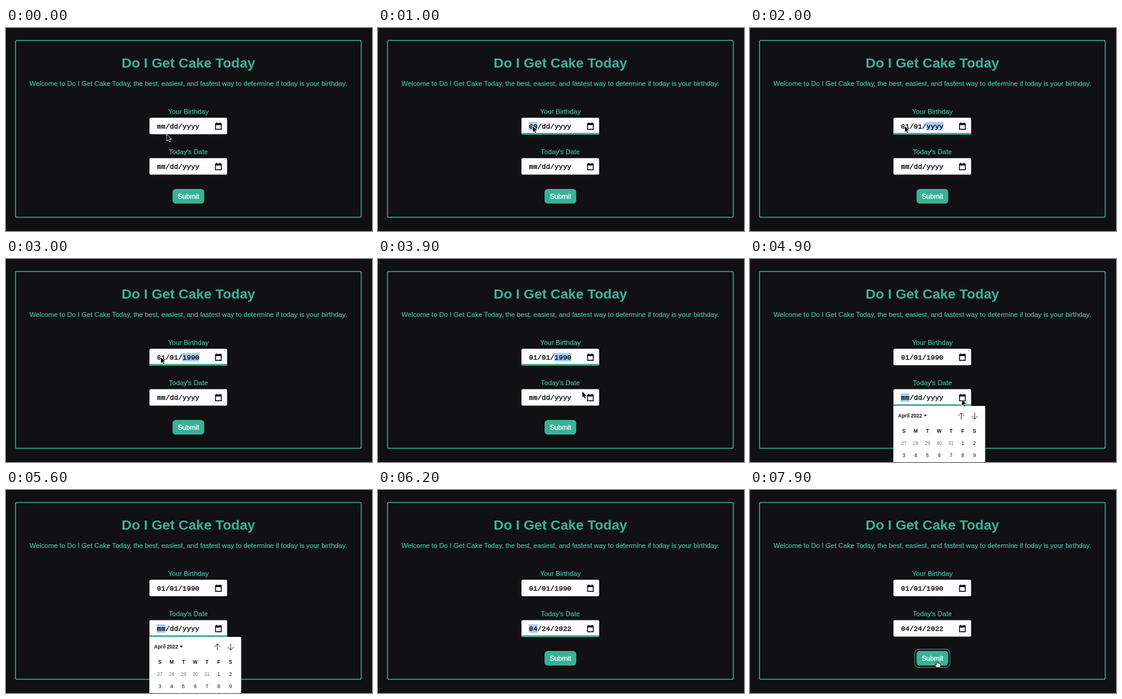
Recreate the animation shown at these times as an HTML page. Size 600 by 333 pixels, loop 8000 ms.

```html
<!DOCTYPE html>
<html lang="en">
<head>
<meta charset="utf-8">
<title>Do I Get Cake Today</title>
<style>
  html, body { margin: 0; width: 100%; height: 100%; overflow: hidden; background: #111012; }
  svg { display: block; width: 600px; height: 333px; }
  text { font: 11.16px "Liberation Sans", Arial, sans-serif; fill: #45bda2; stroke: #45bda2; stroke-width: .2; }
  .mid { text-anchor: middle; }
  .title { font-size: 22.7px; font-weight: bold; fill: #3bb398; stroke: none; }
  .date { font: 11.6px "Liberation Mono", monospace; fill: #000; stroke: #000; stroke-width: .3; }
  .submit { font-size: 11.3px; fill: #fff; stroke: #fff; stroke-width: .3; }
  .teal { fill: #38b196; }
  .line { fill: none; stroke: #3bb097; }
  #popup text { font-size: 8.2px; fill: #111; stroke: none; }
  #popup .bold { font-weight: bold; }
  #popup .dim { fill: #777; }
</style>
</head>
<body>
<svg viewBox="0 0 600 333">
  <defs>
    <g id="calendar">
      <path d="M.8 2H10.2V11.2H.8Z" fill="none" stroke="#000" stroke-width="1.4"/>
      <path d="M.5 1.5H10.5V4.3H.5ZM2 0H3.5V2H2ZM7.5 0H9V2H7.5Z"/>
    </g>
  </defs>
  <rect width="600" height="333" fill="#111012"/>
  <rect class="line" x="15.6" y="20.6" width="566.8" height="290" rx="2" stroke-width="1.5"/>
  <text class="mid title" x="299" y="65">Do I Get Cake Today</text>
  <text class="mid" x="298.8" y="95">Welcome to Do I Get Cake Today, the best, easiest, and fastest way to determine if today is your birthday.</text>
  <text class="mid" x="299" y="141.3">Your Birthday</text>
  <text class="mid" x="299" y="207.2">Today's Date</text>
  <g id="fields"></g>
  <rect id="ring" class="line" x="270" y="261.2" width="57.8" height="29.8" rx="6.5"/>
  <rect class="teal" x="273" y="264" width="52" height="24" rx="5.5"/>
  <text class="mid submit" x="299" y="280">Submit</text>
  <g id="popup">
    <rect x="235" y="241" width="150.5" height="92" fill="#fff"/>
    <text class="bold" x="242.8" y="260">April 2022</text>
    <path d="M285 255.5h5l-2.5 3z"/>
    <path d="M346.3 263V252.5M341.3 257.5L346.3 252.5L351.3 257.5M368.3 252V262.5M363.3 257.5L368.3 262.5L373.3 257.5" fill="none" stroke="#222"/>
  </g>
  <path id="arrow" d="M0 0V11L2.6 8.7L4.3 12.5L6.2 11.7L4.5 8H7.9Z" fill="#000" stroke="#fff" stroke-width=".8"/>
  <path id="hand" d="M-.9 .9Q0 -.7 .9 .9V4.2Q2 3.4 2.8 4.6Q3.9 3.9 4.6 5.1Q6 4.7 6 6.2V8.2L4.9 11H-.5L-3.5 7.2Q-3.3 5.6 -.9 7Z" fill="#fff" stroke="#111" stroke-width=".9"/>
</svg>
<script>
  const LOOP = 8000, PITCH = 6.96;
  const $ = id => document.getElementById(id);
  const show = (el, on) => el.style.display = on ? "" : "none";

  function add(parent, tag, attrs, text = "") {
    const el = document.createElementNS("http://www.w3.org/2000/svg", tag);
    for (const key in attrs) el.setAttribute(key, attrs[key]);
    el.textContent = text;
    return parent.appendChild(el);
  }

  function makeField(y) {
    const g = add($("fields"), "g", { transform: `translate(0 ${y})` });
    add(g, "rect", { x: 235.2, y: 0.3, width: 127.3, height: 27, rx: 2, fill: "#fdfdff" });
    const underline = add(g, "rect", { class: "teal", x: 235.2, y: 25, width: 127.3, height: 2.9, rx: 1 });
    const mark = add(g, "rect", { y: 7, height: 14, fill: "#a9cdf8" });
    const value = add(g, "text", { class: "date", x: 247.5, y: 18 });
    add(g, "use", { href: "#calendar", x: 342.7, y: 8 });
    // part: 0 month, 1 day, 2 year, -1 no focus
    return (text, part) => {
      value.textContent = text;
      show(underline, part >= 0);
      show(mark, part >= 0);
      mark.setAttribute("x", 247 + part * 3 * PITCH);
      mark.setAttribute("width", (part == 2 ? 4 : 2) * PITCH + 0.5);
    };
  }

  const setBirthday = makeField(147), setToday = makeField(213.3);

  for (let col = 0; col < 7; col++) {
    const x = 252.3 + col * 19.3;
    const cell = (y, text, cls = "") => add($("popup"), "text", { class: "mid " + cls, x, y }, text);
    cell(285, "SMTWTFS"[col], "bold");
    cell(305, col < 5 ? 27 + col : col - 4, col < 5 ? "dim" : "");
    cell(325, 3 + col);
  }

  // [start time, text, focused part]
  const birthday = [
    [0, "mm/dd/yyyy", -1], [600, "mm/dd/yyyy", 0],
    [950, "00/dd/yyyy", 0], [1100, "01/dd/yyyy", 1],
    [1350, "01/00/yyyy", 1], [1500, "01/01/yyyy", 2],
    [2300, "01/01/0001", 2], [2500, "01/01/0019", 2],
    [2600, "01/01/0199", 2], [2800, "01/01/1990", 2],
    [4300, "01/01/1990", -1]
  ];
  const today = [
    [0, "mm/dd/yyyy", -1], [4300, "mm/dd/yyyy", 0],
    [6000, "04/24/2022", 0], [7400, "04/24/2022", -1]
  ];
  // [time, x, y]
  const path = [
    [0, 263.5, 174.5], [500, 253.5, 160.5], [3300, 253.5, 160.5], [4100, 349.5, 227],
    [4850, 349.5, 227], [5400, 252, 350], [6400, 252, 350], [7100, 306.5, 280], [LOOP, 306.5, 280]
  ];

  const stateAt = (steps, t) => steps.findLast(s => s[0] <= t).slice(1);

  function pointerAt(t) {
    const i = path.findIndex(p => p[0] > t);
    const [t0, x0, y0] = path[i - 1], [t1, x1, y1] = path[i];
    const u = (t - t0) / (t1 - t0), k = u * u * (3 - 2 * u);
    return [x0 + (x1 - x0) * k, y0 + (y1 - y0) * k];
  }

  function draw(now) {
    const t = now % LOOP;
    setBirthday(...stateAt(birthday, t));
    setToday(...stateAt(today, t));
    show($("popup"), t >= 4700 && t < 6000);
    show($("ring"), t >= 7400);
    const [x, y] = pointerAt(t);
    const onButton = x > 273 && x < 325 && y > 264 && y < 288;
    for (const id of ["arrow", "hand"]) {
      $(id).setAttribute("transform", `translate(${x} ${y})`);
      show($(id), onButton == (id == "hand"));
    }
    requestAnimationFrame(draw);
  }
  requestAnimationFrame(draw);
</script>
</body>
</html>
```
